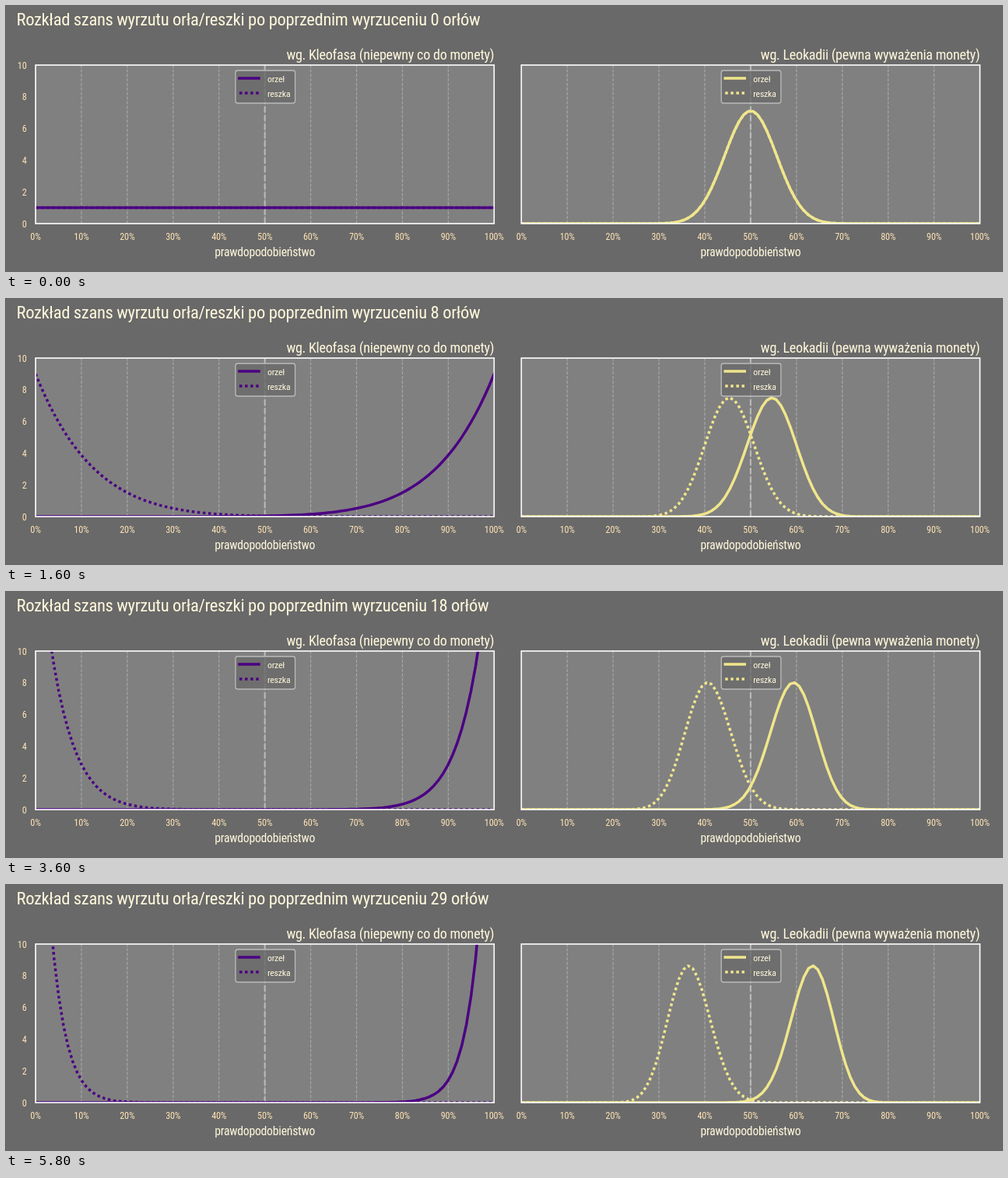
An HTML page for the animation above (6000 ms loop, 1280 px wide and 341 px high).

```html
<!DOCTYPE html>
<html lang="pl">
<head>
<meta charset="utf-8">
<title>Rozkład szans</title>
<style>
  html, body { margin: 0; width: 100%; height: 100%; overflow: hidden; background: #696969; }
  svg { display: block; width: 1280px; height: 341px; }
  text { font-stretch: 62.5%; letter-spacing: -0.015em; fill: #fff8dc; white-space: pre; }
  .tick { fill: #ffe4b5; }
  .curve { fill: none; stroke-width: 3.5; stroke-linecap: square; stroke-linejoin: round; }
  .dotted { stroke-dasharray: 3.5 3.6; stroke-linecap: butt; }
  .grid { stroke: #a9a9a9; stroke-width: 1.1; stroke-dasharray: 4.1 1.8; }
  .half { stroke: #b9b9b9; stroke-width: 2.1; stroke-dasharray: 7.7 3.3; }
  .frame { fill: none; stroke: #fff; stroke-width: 1.6; }
  .legend { fill: #696969; fill-opacity: .8; stroke: #ccc; stroke-opacity: .8; stroke-width: 1.3; }
</style>
</head>
<body>
<svg id="stage" viewBox="0 0 1280 341"></svg>
<script>
const STEP = 200, STEPS = 30, POINTS = 100;
const PRIOR = 40;
const TOP = 76, BOTTOM = 280, WIDTH = 589.3, Y_MAX = 10;
const stage = document.getElementById('stage');

function add(parent, tag, attrs) {
  const node = document.createElementNS('http://www.w3.org/2000/svg', tag);
  for (const key in attrs) node.setAttribute(key, attrs[key]);
  return parent.appendChild(node);
}

const heading = n => `Rozkład szans wyrzutu orła/reszki po poprzednim wyrzuceniu ${n} orłów`;

function measure(string, family) {
  const node = add(stage, 'text', { 'font-family': family, 'font-size': 100 });
  node.textContent = string;
  const length = node.getComputedTextLength();
  node.remove();
  return length;
}

// Prefer the narrowest humanist or grotesque face available.
const family = ["'Noto Sans', sans-serif", "'Open Sans', sans-serif", "'Roboto Condensed', Roboto, sans-serif", 'Roboto, sans-serif']
  .map(name => ({ name, length: measure(heading(0), name) }))
  .reduce((a, b) => b.length < a.length ? b : a).name;
stage.setAttribute('font-family', family);

const sizeFor = (string, length) => 100 * length / measure(string, family);
const size = {
  heading: sizeFor(heading(0), 596),
  title: sizeFor('wg. Kleofasa (niepewny co do monety)', 267),
  label: sizeFor('prawdopodobieństwo', 129),
  legend: sizeFor('reszka', 29.5),
  tick: sizeFor('100%', 25)
};

function text(string, x, y, role, anchor = 'start') {
  const node = add(stage, 'text', { x, y, class: role, 'font-size': size[role], 'text-anchor': anchor });
  node.textContent = string;
  return node;
}

const yOf = value => BOTTOM - value / Y_MAX * (BOTTOM - TOP);

function logFactorial(n) {
  let sum = 0;
  for (let i = 2; i <= n; i++) sum += Math.log(i);
  return sum;
}

// Path of the Beta(a, b) density, optionally mirrored.
function betaPath(left, a, b, mirrored) {
  const scale = Math.exp(logFactorial(a + b - 1) - logFactorial(a - 1) - logFactorial(b - 1));
  let d = '';
  for (let i = 0; i < POINTS; i++) {
    const x = i / (POINTS - 1), p = mirrored ? 1 - x : x;
    const value = scale * Math.pow(p, a - 1) * Math.pow(1 - p, b - 1);
    d += (i ? 'L' : 'M') + (left + x * WIDTH).toFixed(2) + ' ' + yOf(value).toFixed(2);
  }
  return d;
}

function panel(left, title, color, prior) {
  const right = left + WIDTH, middle = left + WIDTH / 2;
  const box = { x: left, y: TOP, width: WIDTH, height: BOTTOM - TOP };
  const clipId = 'clip' + left;
  add(add(stage, 'clipPath', { id: clipId }), 'rect', box);
  add(stage, 'rect', { ...box, fill: '#808080' });

  for (let i = 0; i <= 10; i++) {
    const x = left + WIDTH * i / 10;
    if (i % 10) add(stage, 'path', { class: 'grid', d: `M${x} ${BOTTOM}V${TOP}` });
    text(i * 10 + '%', x, 300.5, 'tick', 'middle');
  }
  add(stage, 'path', { class: 'half', d: `M${middle} ${BOTTOM}V${TOP}` });

  const plot = add(stage, 'g', { 'clip-path': `url(#${clipId})` });
  const heads = add(plot, 'path', { class: 'curve', stroke: color });
  const tails = add(plot, 'path', { class: 'curve dotted', stroke: color });
  add(stage, 'rect', { ...box, class: 'frame' });
  text(title, right, 69, 'title', 'end');
  text('prawdopodobieństwo', middle, 322, 'label', 'middle');

  const x = middle - 37.7;
  add(stage, 'rect', { class: 'legend', x, y: 83, width: 76.6, height: 42, rx: 2.8 });
  ['orzeł', 'reszka'].forEach((name, i) => {
    const y = 93 + i * 19;
    add(stage, 'path', { class: i ? 'curve dotted' : 'curve', stroke: color, d: `M${x + 5} ${y}h25` });
    text(name, x + 41, y + 4.5, 'legend-text'.slice(0, 6), 'start').setAttribute('class', '');
  });

  return n => {
    heads.setAttribute('d', betaPath(left, prior + n, prior, false));
    tails.setAttribute('d', betaPath(left, prior + n, prior, true));
  };
}

const headline = text('', 13.5, 25, 'heading');
for (let v = 0; v <= Y_MAX; v += 2) text(v, 26.5, yOf(v) + 4.5, 'tick', 'end');
const panels = [
  panel(38, 'wg. Kleofasa (niepewny co do monety)', '#4b0082', 1),
  panel(662.3, 'wg. Leokadii (pewna wyważenia monety)', '#f0e68c', PRIOR)
];

let shown = -1;
function draw(time) {
  const n = Math.floor(time / STEP) % STEPS;
  if (n !== shown) {
    shown = n;
    headline.textContent = heading(n);
    panels.forEach(update => update(n));
  }
}

const start = performance.now();
function tick() {
  draw(performance.now() - start);
  requestAnimationFrame(tick);
}
tick();
</script>
</body>
</html>
```
